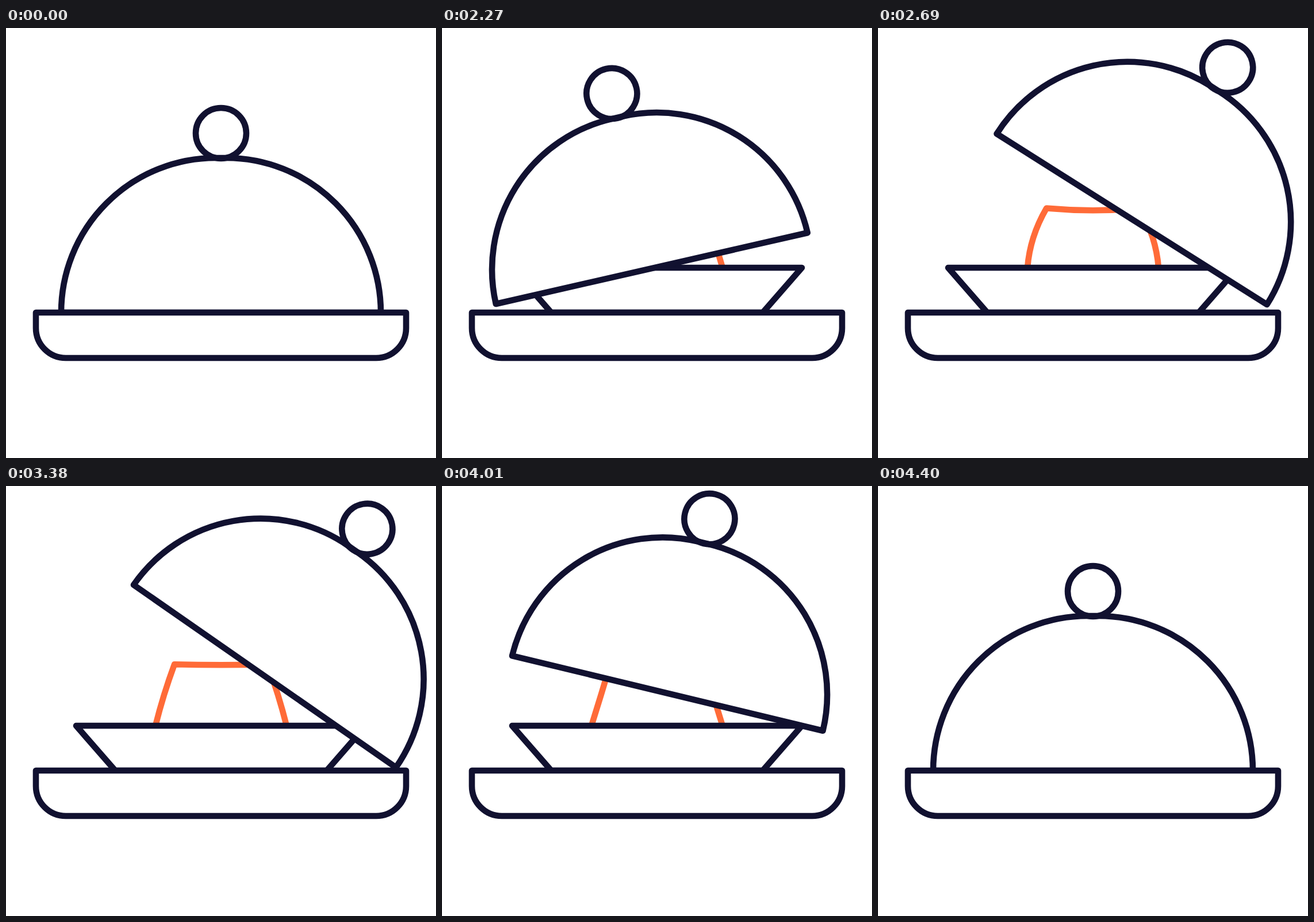
An HTML page that plays this animation: 748x748 px, repeating every 4.43 s.

```html
<!DOCTYPE html>
<html lang="en">
<head>
<meta charset="utf-8">
<title>Serving dish</title>
<style>
  html, body { margin: 0; height: 100%; overflow: hidden; background: #fff; }
  svg { display: block; width: 100vw; height: 100vh; }
</style>
</head>
<body>
<svg viewBox="0 0 748 748" fill="#fff" stroke="#111130" stroke-width="10.6" stroke-linejoin="round" stroke-linecap="round">
  <path id="jelly" stroke="#ff6b38"/>
  <path d="M122 417H626L558 495H190Z"/>
  <g id="lid">
    <path d="M0 0H556A269 269 0 0 0 287 -269H269A269 269 0 0 0 0 0Z"/>
    <circle cx="278" cy="-312" r="44" fill="none"/>
  </g>
  <path d="M52 495H696V522A52 52 0 0 1 644 574H104A52 52 0 0 1 52 522Z"/>
</svg>
<script>
const LOOP = 4430;
const OPEN_ANGLE = 34.83;
const jelly = document.getElementById('jelly');
const lid = document.getElementById('lid');

const progress = (t, from, to) => Math.min(1, Math.max(0, (t - from) / (to - from)));
const smooth = u => u * u * (3 - 2 * u);

// Ease curve with control points (x1, 0) and (x2, 1).
function ease(u, x1, x2) {
  let lo = 0, hi = 1;
  for (let i = 0; i < 24; i++) {
    const m = (lo + hi) / 2, n = 1 - m;
    if (3 * m * n * (n * x1 + m * x2) + m * m * m < u) lo = m;
    else hi = m;
  }
  return smooth((lo + hi) / 2);
}

// Tilt on the left tip, swing open, swing back, settle.
function lidPose(t) {
  const closing = t > 3300;
  const tilt = closing ? 8.8 : 15;
  const lift = closing
    ? ease(1 - progress(t, 3620, 4128), 0.2, 0)
    : ease(progress(t, 2206, 2927), 0.3, 0.05);
  const lean = closing
    ? 1 - smooth(progress(t, 4128, 4390))
    : smooth(progress(t, 2000, 2180));
  const rest = 1 - lift;
  const angle = lift > 1e-5
    ? OPEN_ANGLE - (OPEN_ANGLE + 15) * rest + (15 - tilt) * rest ** 4
    : -tilt * lean;
  return {
    x: 96 + lift * (186 * lift - 60),
    y: 495 - lift * (323 + 95 * rest - 70 * rest * rest),
    angle
  };
}

// Squash of the jelly: 1 is flattest, 0 is at rest.
const wobble = [[2180, 0], [2620, 1], [3110, -0.5], [3380, 0.25], [3530, 0]];
function squash(t) {
  let value = wobble[0][1];
  for (let i = 1; i < wobble.length; i++) {
    const [from, a] = wobble[i - 1], [to, b] = wobble[i];
    value += (b - a) * smooth(progress(t, from, to));
  }
  return value;
}

function draw(t) {
  const { x, y, angle } = lidPose(t);
  lid.setAttribute('transform', `translate(${x} ${y}) rotate(${angle})`);

  const q = squash(t), top = 309 + 5 * q, bulge = 14 * q;
  jelly.setAttribute('d',
    `M260 417Q${277 - bulge} 363 293 ${top}Q374 ${top + 8 * q} 455 ${top}Q${471 + bulge} 363 488 417`);
}

function tick() {
  draw(performance.now() % LOOP);
  requestAnimationFrame(tick);
}
tick();
</script>
</body>
</html>
```
